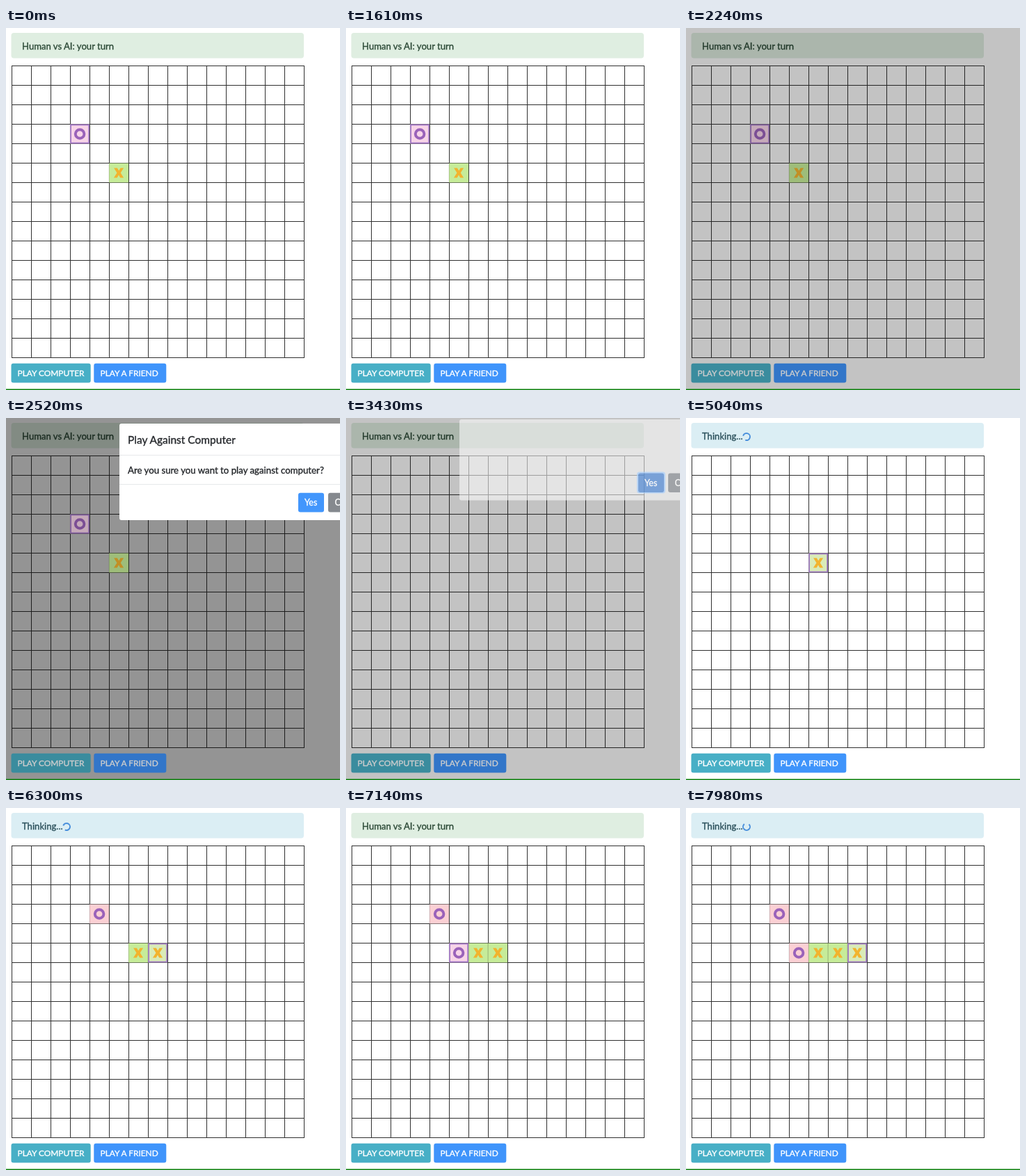
Animation, 480 px wide and 521 px high, one loop 8000 ms. Source, as an HTML page:

```html
<!DOCTYPE html>
<html lang="en">
<head>
<meta charset="utf-8">
<title>Five in a row</title>
<style>
html, body { margin: 0; width: 100%; height: 100%; overflow: hidden; background: #fff; }
svg { display: block; width: 480px; height: 521px; font-family: Lato, "Open Sans", sans-serif; font-size: 13.1px; }
text { stroke: currentColor; stroke-width: .35px; fill: currentColor; }
.btn { font-size: 11.9px; color: #fff; }
</style>
</head>
<body>
<svg viewBox="0 0 480 521">
  <rect width="480" height="521" fill="#fff"/>
  <rect id="bar" x="7.5" y="7" width="420.5" height="36.5" rx="4"/>
  <text id="status" x="23" y="31"></text>
  <circle id="spinner" cx="87" cy="27" r="5" fill="none" stroke="#4a90dc" stroke-width="2" stroke-dasharray="23.56 7.86"/>
  <path id="grid" fill="none" stroke="#303030"/>
  <rect id="backdrop" width="480" height="521"/>
  <g id="pieces">
    <g id="cells"></g>
    <g class="btn">
      <rect x="7.5" y="482.7" width="114.2" height="27.8" rx="3" fill="#48afc6"/>
      <text x="16.5" y="501">PLAY COMPUTER</text>
      <rect x="126.3" y="482.7" width="104" height="27.8" rx="3" fill="#3f94fb"/>
      <text x="135.5" y="501">PLAY A FRIEND</text>
    </g>
  </g>
  <g id="modal">
    <rect id="sheet" x="163" width="500" rx="3" fill="#fff"/>
    <g id="copy" color="#24272b">
      <text x="175" y="37" font-size="15.5">Play Against Computer</text>
      <text x="175" y="80" font-size="13.24">Are you sure you want to play against computer?</text>
      <path d="M163 53.5H480M163 95.5H480" stroke="#e6e8ea"/>
    </g>
    <g id="choices" class="btn">
      <rect id="ring" x="418" y="106" width="41" height="31" rx="4" fill="#a9cffb"/>
      <rect id="yes" x="420" y="107.8" width="37" height="27.7" rx="3"/>
      <text x="429" y="126" font-size="12.4">Yes</text>
      <rect x="463" y="107.8" width="58" height="27.7" rx="3" fill="#85898e"/>
      <text x="472.5" y="126" font-size="12.4">Cancel</text>
    </g>
  </g>
  <rect y="519.5" width="480" height="1.5" fill="#0a800a"/>
</svg>
<script>
const LOOP = 8000, PRESS = 3290, RESET = 3360, TURN = 750;
const MOVES = [
  { mark: "X", col: 5, row: 5, from: 0, to: RESET },
  { mark: "O", col: 3, row: 3, from: 0, to: RESET, last: RESET },
  { mark: "X", col: 6, row: 5, from: 4730, last: 5390 },
  { mark: "O", col: 4, row: 3, from: 5390, last: 5980 },
  { mark: "X", col: 7, row: 5, from: 5980, last: 6650 },
  { mark: "O", col: 5, row: 5, from: 6650, last: 7420 },
  { mark: "X", col: 8, row: 5, from: 7420, last: LOOP }
];

const el = id => document.getElementById(id);
const set = (id, attrs) => {
  for (const key in attrs) el(id).setAttribute(key, attrs[key]);
};
const ramp = (t, a, b) => Math.min(1, Math.max(0, (t - a) / (b - a)));
const easeOut = p => 1 - (1 - p) ** 3;
const lineX = i => 8.5 + i * 28;
const lineY = i => 54.5 + i * 28;

let gridPath = "";
for (let i = 0; i <= 15; i++) {
  gridPath += `M${lineX(i)} 54V475M8 ${lineY(i)}H429`;
}
set("grid", { d: gridPath });

function cell({ mark, col, row }, isLast) {
  const isX = mark === "X";
  const fill = isX ? (isLast ? "#d9ebb8" : "#c6ec99") : (isLast ? "#f8d5e8" : "#fbd0d4");
  const glyph = isX
    ? '<path d="M-7 -7h4.8L.1 -3 2.4 -7H7L2.6 0 7 7H2.1L-.1 3-2.4 7H-7.2L-2.6 0Z" fill="#f2b32e"/>'
    : '<circle r="6.3" fill="none" stroke="#9a62ba" stroke-width="3.9"/>';
  const edge = isLast
    ? '<rect x="-13" y="-13" width="26" height="26" fill="none" stroke="#9b70c4" stroke-width="1.6"/>'
    : "";
  return `<g transform="translate(${lineX(col) + 13.6} ${lineY(row) + 14})">
    <rect x="-14" y="-14" width="28" height="28" fill="${fill}" stroke="#000" stroke-opacity=".12"/>${edge}${glyph}</g>`;
}

let boardKey = "";
function drawBoard(t) {
  const shown = MOVES.filter(m => t >= m.from && t < (m.to || LOOP));
  const key = shown.map(m => MOVES.indexOf(m)).join();
  if (key !== boardKey) {
    el("cells").innerHTML = shown.map(m => cell(m, t < m.last)).join("");
    boardKey = key;
  }
}

function drawStatus(t) {
  const move = MOVES.find(m => m.mark === "X" && m.from > 0 && t >= m.from && t < m.last);
  el("status").textContent = move ? "Thinking..." : "Human vs AI: your turn";
  set("status", { color: move ? "#2b505b" : "#2d4b38" });
  set("bar", { fill: move ? "#dbeef4" : "#dfeee1" });
  const angle = move ? (t - move.from) / TURN * 360 + 45 : 0;
  set("spinner", {
    visibility: move ? "visible" : "hidden",
    transform: `rotate(${angle} 87 27)`
  });
}

function drawModal(t) {
  const dim = 0.42 * Math.min(ramp(t, 2162, 2302), 1 - ramp(t, 3370, 3510));
  set("backdrop", { opacity: dim });
  // Pieces and buttons darken less than the page.
  el("pieces").style.filter = dim ? `brightness(${1 - Math.min(dim, 0.2)})` : "none";

  const enter = ramp(t, 2310, 2510), leave = ramp(t, RESET, 3520);
  const lift = leave > 0 ? 28 * Math.min(1.4, leave / 0.4375) : 35 * (1 - easeOut(enter));
  const top = 8 - lift * 0.21;
  const pressed = t > PRESS;
  const shift = `translate(0 ${-lift})`;
  set("modal", { visibility: enter > 0 && leave < 1 ? "visible" : "hidden" });
  set("sheet", { y: top, height: 147 - lift - top, opacity: enter * (1 - leave) });
  set("copy", { opacity: enter * (1 - ramp(t, RESET, 3425)), transform: shift });
  set("choices", { opacity: enter * (1 - leave ** 1.5), transform: shift });
  set("ring", { opacity: pressed ? 1 : 0 });
  set("yes", { fill: pressed ? "#4d86d3" : "#4296fc" });
}

function draw(t) {
  drawBoard(t);
  drawStatus(t);
  drawModal(t);
}

const start = performance.now();
function tick(now) {
  draw(Math.max(0, now - start) % LOOP);
  requestAnimationFrame(tick);
}
draw(0);
requestAnimationFrame(tick);
</script>
</body>
</html>
```
